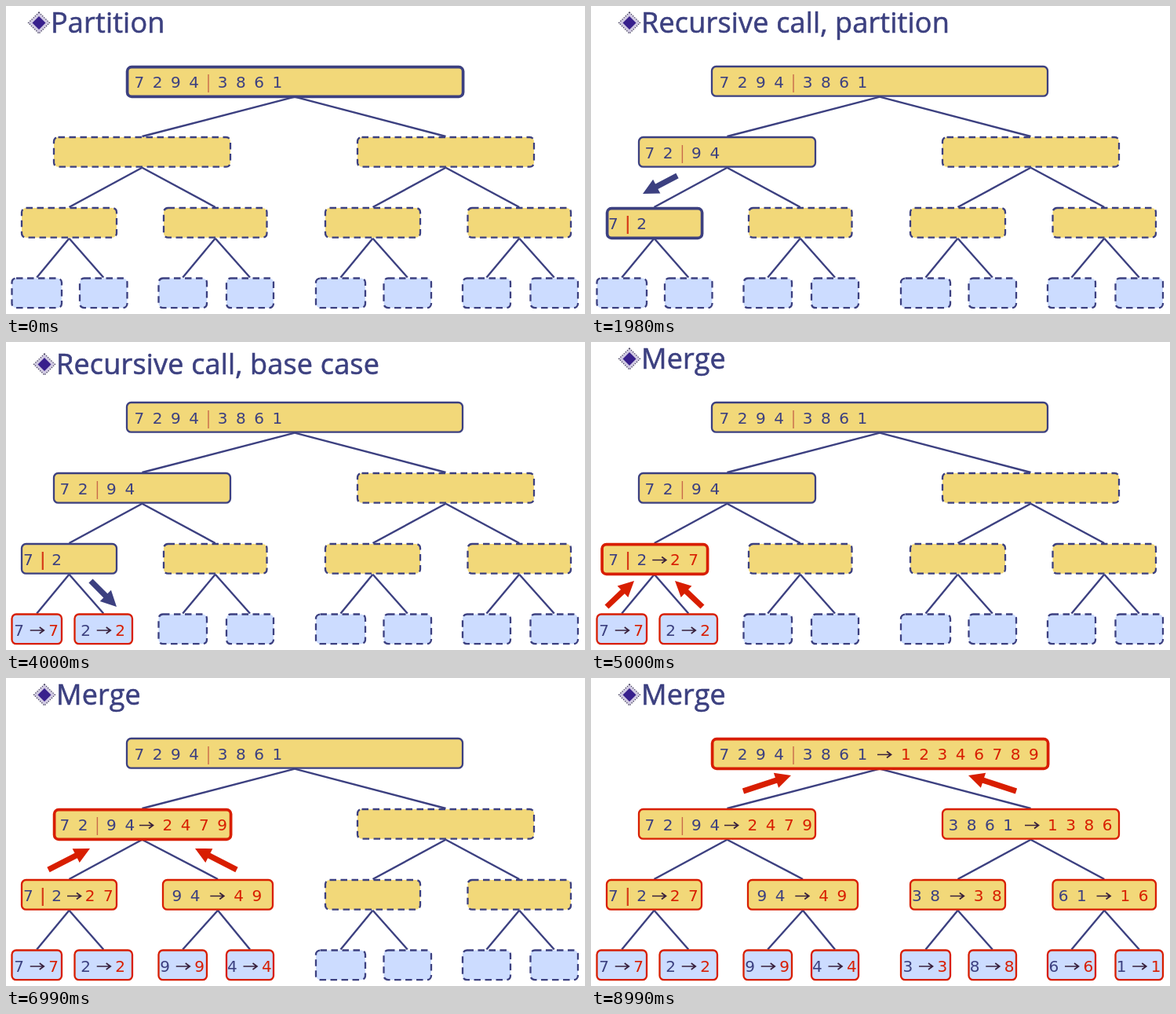
These frames come from a looping animation (738 by 392 pixels, 9.99 s). An HTML page:

```html
<!DOCTYPE html>
<html lang="en">
<head>
<meta charset="utf-8">
<title>Merge sort tree</title>
<style>
  html, body { margin: 0; width: 100%; height: 100%; overflow: hidden; background: #fff; }
  svg { display: block; }
  .title { font: 36px "Comic Sans MS", "Open Sans", sans-serif; letter-spacing: .2px; fill: #3c4080; stroke: #3c4080; stroke-width: .6px; }
  .num { font: 20px Verdana, "DejaVu Sans", sans-serif; word-spacing: 4.2px; }
</style>
</head>
<body>
<svg id="stage" width="738" height="392" viewBox="0 0 738 392"></svg>
<script>
const NAVY = '#3c4080', RED = '#d81e00', GOLD = '#f2d879', BLUE = '#ccdcff';
const LOOP = 9990, PITCH = 23.3, BOX_H = 37.7;
const ROW_Y = [77, 167, 257, 346.5];

// Navy arrows point to the called child, red ones back to the parent: [tail x, y, tip x, y].
// drop lowers the heading.
const steps = [
  { at: 0, title: 'Partition', arrows: [] },
  { at: 1000, title: 'Recursive call, partition', arrows: [[215, 130, 168, 144]] },
  { at: 1980, title: 'Recursive call, partition', arrows: [[110, 216, 66, 239]] },
  { at: 3000, title: 'Recursive call, base case', arrows: [[54, 304, 21, 337]] },
  { at: 4000, title: 'Recursive call, base case', drop: 7, arrows: [[108, 304, 141, 337]] },
  { at: 5000, title: 'Merge', red: true, arrows: [[20, 337, 55, 304], [142, 337, 107, 304]] },
  { at: 5990, title: 'Recursive call, …, base case, merge', red: true, arrows: [[207, 337, 242, 304], [329, 337, 294, 304]] },
  { at: 6990, title: 'Merge', red: true, arrows: [[54, 244, 107, 217], [294, 244, 241, 217]] },
  { at: 7990, title: 'Recursive call, …, merge, merge', drop: 7, red: true, arrows: [[442, 244, 495, 217], [682, 244, 629, 217]] },
  { at: 8990, title: 'Merge', red: true, arrows: [[194, 144, 255, 124], [542, 144, 481, 124]] }
];

// look, per step: d dashed, s solid, r red; a capital is thick.
// show, per step: 0 empty, 1 input, 2 input and result.
// cols: start of input, arrow and result, from the box centre.
const node = (row, box, look, show, input, result, cols, extra) =>
  ({ row, box, look, show, input, result, cols, ...extra });
const pair = (box, look, show, input, result, extra) =>
  node(2, box, look, show, input, result, [-58.5, -9.7, 20.3], extra);
const leaf = (box, look, show, n, extra) =>
  node(3, box, look, show, n, n, [-29, -8.5, 15], extra);

const LATE = 'dddsddddrr', LATE_SHOW = '0000000022';

// Heap order: the children of i are 2i + 1 and 2i + 2
const nodes = [
  node(0, [154, 582], 'SssssssssR', '1111111112', '7 2 9 4|3 8 6 1', '1 2 3 4 6 7 8 9', [-204.5, -3, 27]),
  node(1, [61, 286], 'dSsssssRrr', '0111111222', '7 2|9 4', '2 4 7 9', [-105, -3.5, 26]),
  node(1, [448, 673], 'dddsddddRr', LATE_SHOW, '3 8 6 1', '1 3 6 8', [-105, -7.5, 21.5], { last: '1 3 8 6' }),
  pair([20, 141], 'ddSssRrrrr', '0011122222', '7|2', '2 7',
    { cols: [-58.5, -2.5, 20.3], alt: [13.5, 148], altFrom: 5, altTo: 6 }),
  pair([201, 332.5], 'dddsddRrrr', '0000002222', '9 4', '4 9', { alt: [200, 340], altFrom: 7, altTo: 9 }),
  pair([407, 528], LATE, LATE_SHOW, '3 8', '3 8'),
  pair([588.5, 720], LATE, LATE_SHOW, '6 1', '1 6'),
  leaf([7.5, 71], 'dddRrrrrrr', '0002222222', '7'),
  leaf([94, 154.5], 'dddsrrrrrr', '0000222222', '2', { alt: [87.5, 161], altFrom: 4, altTo: 9 }),
  leaf([194.5, 256], 'dddsddrrrr', '0000000222', '9'),
  leaf([281, 341], 'dddsddrrrr', '0000000222', '4'),
  leaf([395, 458], LATE, LATE_SHOW, '3'),
  leaf([481.5, 542], LATE, LATE_SHOW, '8'),
  leaf([582, 643], LATE, LATE_SHOW, '6'),
  leaf([668.5, 729], LATE, LATE_SHOW, '1')
];

const boxOf = (n, k) => n.alt && k >= n.altFrom && k <= n.altTo ? n.alt : n.box;
const centre = (n, k) => { const [a, b] = boxOf(n, k); return (a + b) / 2; };

const line = (x1, y1, x2, y2, color, width) =>
  `<path d="M${x1} ${y1}L${x2} ${y2}" stroke="${color}" stroke-width="${width}"/>`;
const numbers = (x, y, s, color) => `<text class="num" x="${x}" y="${y}" fill="${color}">${s}</text>`;

function input(x, y, s, row) {
  return s.split('|').map((part, i) => {
    let out = '';
    if (i) {
      out = row === 2 ? line(x + 1.5, y - 17, x + 1.5, y + 6, '#d63a18', 2.2)
                      : line(x + 1.3, y - 17, x + 1.3, y + 6, '#c8694a', 1.4);
      x += 13;
    }
    out += numbers(x, y, part, NAVY);
    x += PITCH * (part.length + 1) / 2;
    return out;
  }).join('');
}

const smallArrow = (x, y) =>
  `<path d="M${x} ${y}h17.5m-5.5 -4l5.5 4l-5.5 4" fill="none" stroke="#38203c" stroke-width="1.7"/>`;

function bigArrow([x1, y1, x2, y2], color) {
  const len = Math.hypot(x2 - x1, y2 - y1);
  const turn = Math.atan2(y2 - y1, x2 - x1) * 180 / Math.PI;
  return `<path transform="translate(${x2} ${y2}) rotate(${turn})" fill="${color}"
    d="M0 0L-20 -10V-3.6H${-len}V3.6H-20V10Z"/>`;
}

function edges(n, i, k) {
  return [2 * i + 1, 2 * i + 2].filter(c => c < nodes.length).map(c =>
    line(centre(n, k), ROW_Y[n.row] + 38.7, centre(nodes[c], k), ROW_Y[n.row + 1] - 1, NAVY, 2.4)).join('');
}

function drawNode(n, k) {
  const [a, b] = boxOf(n, k), look = n.look[k], kind = look.toLowerCase();
  const y = ROW_Y[n.row], base = y + 27, mid = (a + b) / 2;
  const thick = look !== kind, shift = thick ? 0.6 : 0;
  let out = `<rect x="${a + shift}" y="${y + shift}" width="${b - a}" height="${BOX_H}" rx="5.5"
    fill="${n.row === 3 ? BLUE : GOLD}" stroke="${kind === 'r' ? RED : NAVY}"
    stroke-width="${thick ? 3.7 : 2.3}" ${kind === 'd' ? 'stroke-dasharray="8.5 5.5"' : ''}/>`;
  const [from, arrow, to] = n.cols.map(c => mid + c);
  if (n.show[k] > 0) out += input(from, base, n.input, n.row);
  if (n.show[k] > 1) {
    out += smallArrow(arrow, base - 6.5);
    out += numbers(to, base, k === 9 && n.last || n.result, RED);
  }
  return out;
}

function heading({ title, drop = 0 }, k) {
  const x = k ? 49 : 42;
  return `<g transform="translate(${x} ${21.5 + drop})">
    <path d="M0 -13.5L13.5 0L0 13.5L-13.5 0Z" fill="#d0c9e2" stroke="#4a4660" stroke-width="1.3" stroke-dasharray="1.4 1.6"/>
    <path d="M0 -8.5L8.5 0L0 8.5L-8.5 0Z" fill="#38208c"/>
    <text class="title" x="15" y="12.5">${title}</text></g>`;
}

const stage = document.getElementById('stage');
let shown = -1;

function tick() {
  const t = performance.now() % LOOP;
  const k = steps.filter(s => s.at <= t).length - 1;
  if (k !== shown) {
    const step = steps[k];
    stage.innerHTML = heading(step, k)
      + nodes.map((n, i) => edges(n, i, k)).join('')
      + nodes.map(n => drawNode(n, k)).join('')
      + step.arrows.map(a => bigArrow(a, step.red ? RED : NAVY)).join('');
    shown = k;
  }
  requestAnimationFrame(tick);
}
tick();
</script>
</body>
</html>
```
